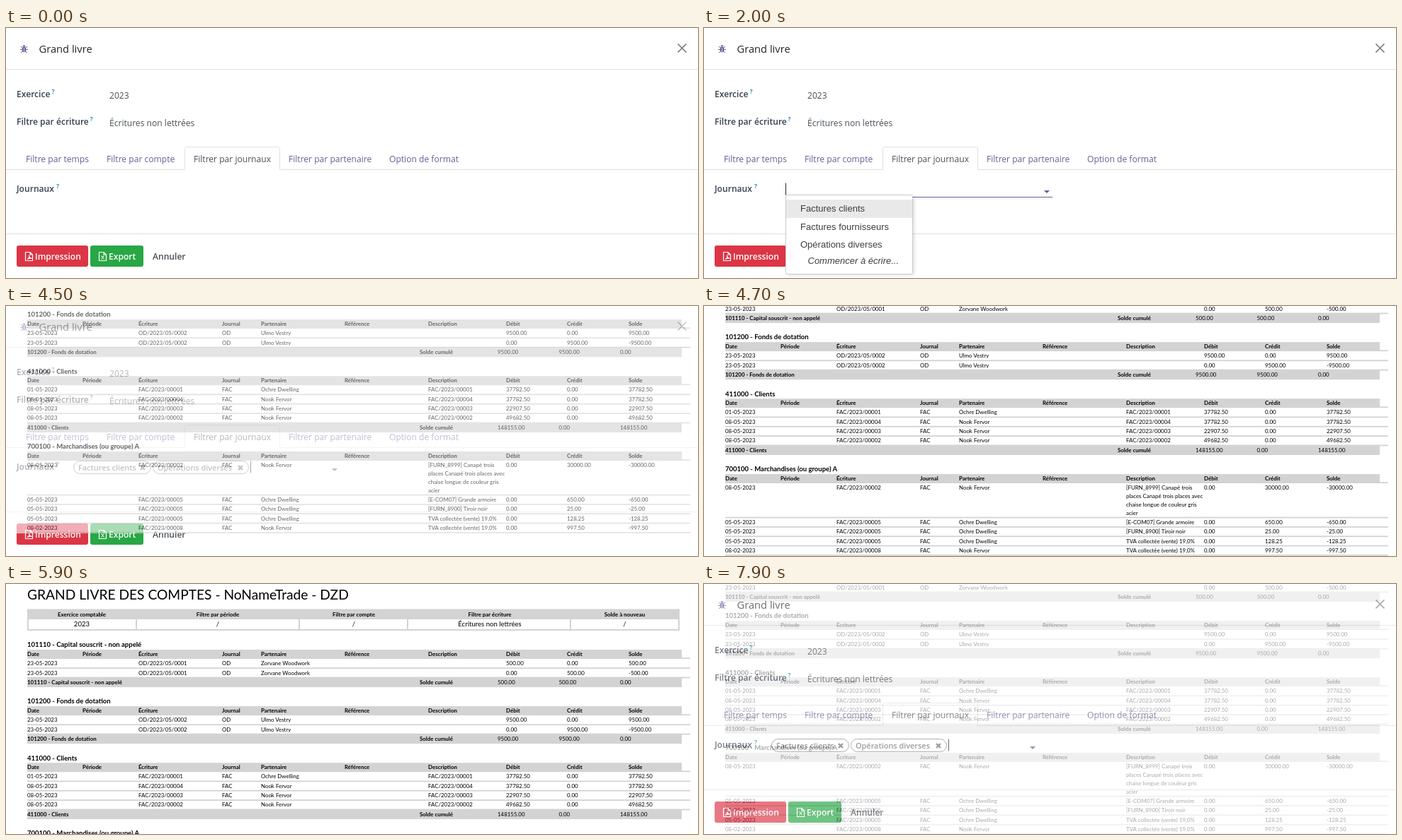
An HTML page that plays this animation: 977x354 px, repeating every 8 s.

```html
<!DOCTYPE html>
<html lang="fr">
<head>
<meta charset="utf-8">
<style>
  html, body { margin: 0; width: 100%; height: 100%; overflow: hidden; background: #fff; }
  svg { display: block; font: 12.1px "Open Sans", sans-serif; fill: #495057; }
  .label { font-weight: 600; fill: #374151; }
  .help { font-size: 9px; font-weight: 600; fill: #0180a5; }
  .tab, .arrow { fill: #6a5c96; }
  .line { fill: none; stroke: #dee0e3; }
  .button { font-weight: 600; fill: #fff; }
  .icon { fill: none; stroke: #fff; stroke-width: 1.2; }
  .menu { font: 13px "Liberation Sans", Arial, sans-serif; fill: #3c3f44; }
  .tag { font-size: 10.9px; font-weight: 600; fill: #6b6b6b; }
  .caret { stroke: #222; }
  #report { font: 7.9px Lato, sans-serif; fill: #000; }
  #report .bold { font-weight: 700; }
  .grey { fill: #d3d3d3; }
</style>
</head>
<body>
<svg id="stage" width="977" height="354" viewBox="0 0 977 354"></svg>
<script>
const text = (x, y, s, attrs = '') => `<text x="${x}" y="${y}" ${attrs}>${s}</text>`;
const rect = (x, y, w, h, attrs = '') => `<rect x="${x}" y="${y}" width="${w}" height="${h}" ${attrs}/>`;
const path = (d, attrs = '') => `<path d="${d}" ${attrs}/>`;
const label = (x, y, s, helpX) => text(x, y, s, 'class="label"') + text(helpX, y - 5, '?', 'class="help"');
const arrow = x => path(`M${x - 4} 230h8l-4 4z`, 'class="arrow"');
const caret = x => path(`M${x} 219.5v17`, 'class="caret"');
const pageIcon = (x, mark) => path(
  `M${x} 317.5h6.5l3.5 3.5v8.5h-10zM${x + 6.5} 317.5v3.5h3.5` + mark, 'class="icon"');

function formMarkup() {
  const tabs = [[28, 'Filtre par temps'], [142, 'Filtre par compte'],
    [399, 'Filtrer par partenaire'], [541, 'Option de format']];
  return rect(0, 0, 977, 354, 'fill="#fff"')
    + '<g fill="#6a5c96" stroke="#6a5c96"><ellipse cx="25.5" cy="30.5" rx="2.8" ry="4" stroke="none"/>'
    + path('M23.5 26.2a2 2 0 0 1 4 0z', 'stroke="none"')
    + path('M20 30.5h11M21 26l2.5 2M30 26l-2.5 2M21 35l2.5-2.200M30 35l-2.500-2.200')
    + path('M25.5 28v6.5', 'stroke="#fff" stroke-width=".8"') + '</g>'
    + text(46.5, 34.5, 'Grand livre', 'font-size="14.7" font-weight="500" fill="#212529"')
    + path('M948.5 22.500l12 12m0-12l-12 12', 'stroke="#777" stroke-width="1.6"')
    + path('M0 58.5h977M0 291.5h977M0 200.5h252.5v-29q0-3 3-3h128q3 0 3 3v29H977', 'class="line"')
    + label(15, 98, 'Exercice', 64.5) + text(146, 100, '2023')
    + label(15, 137, 'Filtre par écriture', 118.5) + text(146, 139, 'Écritures non lettrées')
    + tabs.map(([x, s]) => text(x, 190, s, 'class="tab"')).join('')
    + text(265, 190, 'Filtrer par journaux')
    + `<g id="journals">${label(15, 232, 'Journaux', 71)}</g>`
    + rect(15, 308, 101, 30, 'rx="3" fill="#dc3545"') + rect(119, 308, 75, 30, 'rx="3" fill="#28a745"')
    + pageIcon(27.5, 'm-7.500 6.500q4-2 2.500-5.500q0 3.500 4 4.500q-3-1-6.500 1')
    + pageIcon(131.5, 'm-7 1.500l4 5m0-5l-4 5')
    + text(41, 328, 'Impression', 'class="button"') + text(145, 328, 'Export', 'class="button"')
    + text(207, 328, 'Annuler', 'font-weight="600"');
}

function dropdownMarkup() {
  return caret(115.5) + path('M115 239.5h377', 'stroke="#6a5c96"') + arrow(484)
    + rect(115.5, 236.5, 179, 112, 'rx="3" fill="#fff" stroke="#ccc" style="filter:drop-shadow(2px 1px 2px #0002)"')
    + rect(116, 243, 178, 26, 'fill="#e9e9e9"')
    + '<g class="menu">' + text(136, 260, 'Factures clients') + text(136, 286, 'Factures fournisseurs')
    + text(136, 311, 'Opérations diverses')
    + text(146.5, 334, 'Commencer à écrire...', 'font-style="italic"') + '</g>';
}

function tagsMarkup() {
  const tag = (x, w, s) => rect(x + .5, 219.5, w - 1, 18, 'rx="9" fill="#fff" stroke="#888"')
    + text(x + 7, 233, s, 'class="tag"')
    + path(`M${x + w - 15} 226l6 6m0-6l-6 6`, 'stroke="#6b6b6b" stroke-width="2.4"');
  return tag(95, 110, 'Factures clients') + tag(207, 136, 'Opérations diverses') + caret(345.5) + arrow(464);
}

const COLUMNS = [30, 108, 187, 305, 360, 478, 596, 706, 792, 879];
const HEADINGS = ['Date', 'Période', 'Écriture', 'Journal', 'Partenaire', 'Référence',
  'Description', 'Débit', 'Crédit', 'Solde'];
const WOOD = 'Ulmo Vestry', INTERIOR = 'Ochre Dwelling', DECO = 'Nook Fervor', FURNITURE = 'Zorvane Woodwork';
const SOFA = '[FURN_8999] Canapé trois|places Canapé trois places avec|chaise longue de couleur gris|acier';
const VAT = 'TVA collectée (vente) 19,0%';

// Row: date, entry, partner, description, debit, credit
const invoice = (day, n, amount) =>
  [day, `FAC/2023/0000${n}`, n === 1 ? INTERIOR : DECO, `FAC/2023/0000${n}`, amount, 0];
const sale = (date, n, partner, item, amount) => [date, `FAC/2023/0000${n}`, partner, item, 0, amount];
const transfer = (n, partner, amount) => [[amount, 0], [0, amount]].map(sides =>
  ['23-05', `OD/2023/05/000${n}`, partner, '', ...sides]);
const ACCOUNTS = [
  ['101110 - Capital souscrit - non appelé', transfer(1, FURNITURE, 500)],
  ['101200 - Fonds de dotation', transfer(2, WOOD, 9500)],
  ['411000 - Clients', [invoice('01-05', 1, 37782.5), invoice('08-05', 4, 37782.5),
    invoice('08-05', 3, 22907.5), invoice('08-05', 2, 49682.5)]],
  ['700100 - Marchandises (ou groupe) A', [
    sale('08-05', 2, DECO, SOFA, 30000),
    sale('05-05', 5, INTERIOR, '[E-COM07] Grande armoire', 650),
    sale('05-05', 5, INTERIOR, '[FURN_8900] Tiroir noir', 25),
    sale('05-05', 5, INTERIOR, VAT, 128.25),
    sale('08-02', 8, DECO, VAT, 997.5)]],
];

function reportMarkup() {
  const bold = 'class="bold"', grey = 'class="grey"', ROW = 13.35;
  const money = v => v.toFixed(2);
  const rule = y => rect(30, y, 936, 1.8, grey);
  let out = rect(0, -60, 977, 536, 'fill="#fff"')
    + text(30, 22, 'GRAND LIVRE DES COMPTES - NoNameTrade - DZD', 'font-size="19.2"')
    + rect(30, 35.5, 921, 14.5, grey)
    + path('M31 50v15h919v-15M184 36v29M414 36v29M567 36v29M797 36v29',
      'fill="none" stroke="#d3d3d3" stroke-width="2"');
  [[107, 'Exercice comptable', '2023'], [299, 'Filtre par période', '/'], [491, 'Filtre par compte', '/'],
    [683, 'Filtre par écriture', 'Écritures non lettrées'], [873.5, 'Solde à nouveau', '/']]
    .forEach(([x, head, value]) => {
      out += text(x, 46, head, 'class="bold" text-anchor="middle"')
        + text(x, 60.2, value, 'font-size="9.6" text-anchor="middle"');
    });

  let y = 86;
  for (const [title, rows] of ACCOUNTS) {
    out += text(30, y + 3.3, title, 'class="bold" font-size="9.5"') + rect(30, y + 7, 924, 12, grey) + rule(y + 18.2);
    HEADINGS.forEach((head, i) => out += text(COLUMNS[i], y + 15.8, head, bold));
    y += 26.4;
    let debits = 0, credits = 0;
    for (const [date, entry, partner, item, debit, credit] of rows) {
      const lines = item.split('|'), journal = entry.split('/')[0];
      const cells = [date + '-2023', '', entry, journal, partner, '', '',
        money(debit), money(credit), money(debit - credit)];
      cells.forEach((s, i) => {
        if (s) out += text(COLUMNS[i], y + 2.8, s, i === 3 ? 'class="journal"' : '');
      });
      lines.forEach((s, i) => out += text(COLUMNS[6], y + 2.8 + 11.9 * i, s));
      y += ROW + 11.8 * (lines.length - 1);
      out += rule(y - 7.5);
      debits += debit;
      credits += credit;
    }
    if (debits) {
      out += rect(30, y - 7, 924, 14, grey) + text(30, y + 2.8, title, bold) + text(584, y + 2.8, 'Solde cumulé', bold);
      [debits, credits, debits - credits].forEach((v, i) =>
        out += text(694 + 86.5 * i, y + 2.8, money(v)));
    }
    y += 27;
  }
  return out;
}

const stage = document.getElementById('stage');
stage.innerHTML = formMarkup() + `<g id="dropdown">${dropdownMarkup()}</g>`
  + `<g id="tags">${tagsMarkup()}</g><g id="report">${reportMarkup()}</g>`;
const [journals, dropdown, tags, report] =
  ['journals', 'dropdown', 'tags', 'report'].map(id => document.getElementById(id));
const journalCells = document.querySelectorAll('.journal');

function draw(now) {
  const t = now % 8000;
  // Transitions advance in 100 ms steps
  const progress = (start, steps) =>
    Math.min(1, Math.max(0, Math.floor((t - start) / 100) + 1) / steps);
  const blink = start => t >= start && t < start + 800 && (t - start) % 400 < 200 ? 'hidden' : 'visible';
  const choose = progress(3000, 4), enter = progress(4300, 5), pan = progress(5700, 4), leave = progress(7800, 3);

  journals.style.visibility = blink(1000);
  const cells = blink(7000);
  journalCells.forEach(cell => cell.style.visibility = cells);
  dropdown.style.opacity = progress(1800, 3) - choose;
  tags.style.opacity = choose;
  report.style.opacity = enter - leave;
  report.setAttribute('transform', `translate(0 ${Math.round(-202 + 80 * enter + 163 * pan - 243 * leave)})`);
  requestAnimationFrame(() => draw(performance.now()));
}
draw(0);
</script>
</body>
</html>
```
